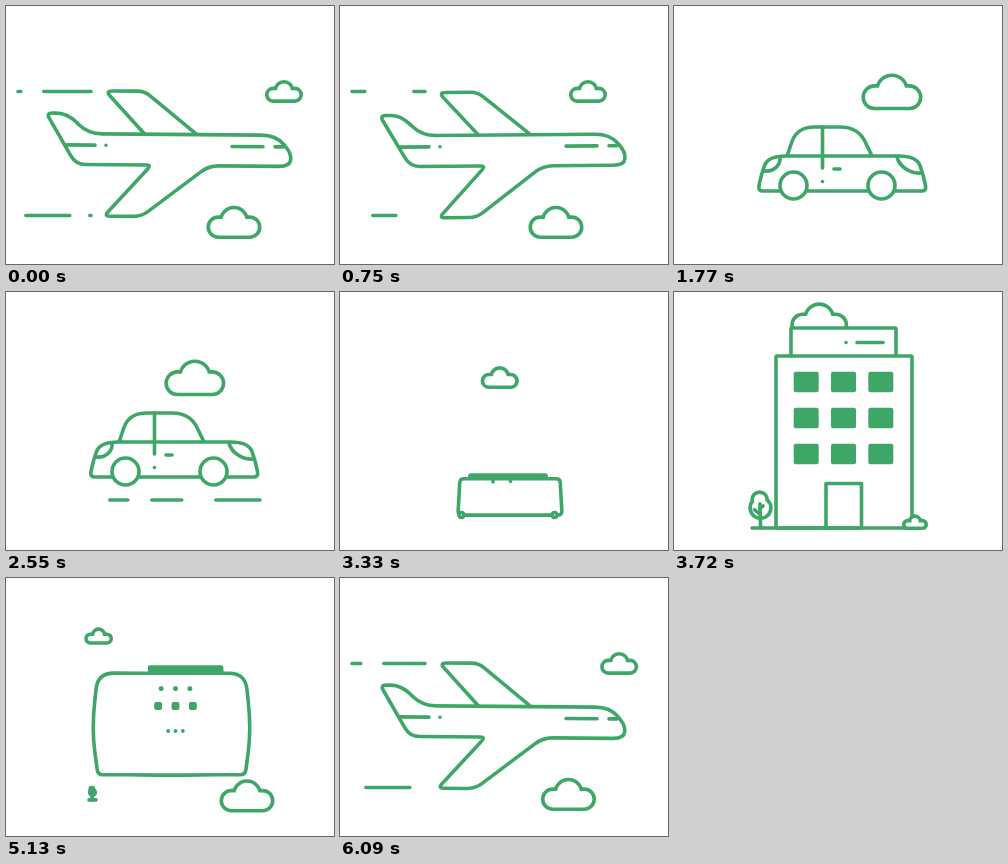
An HTML page with a canvas for the animation above (6.12 s loop, 328 by 258 pixels).

```html
<!DOCTYPE html>
<html lang="en">
<head>
<meta charset="utf-8">
<title>Plane, car, building</title>
<style>
html, body { margin: 0; width: 100%; height: 100%; overflow: hidden; background: #fff; }
canvas { display: block; }
</style>
</head>
<body>
<canvas id="stage" width="328" height="258"></canvas>
<script>
const c = document.getElementById('stage').getContext('2d');
const GREEN = '#3ea768', LOOP = 6120, LINE = 3.6, FIRST_MORPH = 1530, SCENE = 1800;

const lerp = (a, b, k) => a + (b - a) * k;
const ramp = (t, a, b) => Math.min(1, Math.max(0, (t - a) / (b - a)));
const blend = (a, b, k) => a.map((v, i) => lerp(v, b[i], k));

// 0 plane, 1 car, 2 building, 3 plane again; halves are the squashed shapes between
function phaseAt(t) {
  let p = 0;
  for (let i = 0; i < 3; i++) {
    const mid = FIRST_MORPH + i * SCENE;
    p += (ramp(t, mid - 100, mid) + ramp(t, mid, mid + 170)) / 2;
  }
  return p;
}
// Seven poses, one for each half phase
function pose(p, poses) {
  const i = Math.min(5, Math.floor(p * 2));
  return blend(poses[i], poses[i + 1], p * 2 - i);
}

// Box as a ring of [x, y, radius], with leaning and bulging sides
function box(x1, y1, x2, y2, lean, bulge, r) {
  const side = lean / 2 - bulge, y = lerp(y1, y2, .55), foot = Math.min(r, 5);
  const bottom = [.2, .4, .6, .8].map(k => [lerp(x2, x1, k), y2, 0]);
  return [[x1 + side, y, 36], [x1 + lean, y1, r], [lerp(x1, x2, .3), y1, 0], [x2 - lean, y1, r],
    [x2 - side, y, 36], [x2, y2, foot], ...bottom, [x1, y2, foot]].flat();
}
const plane = [
  [40, 108.3, 6], [61, 108.3, 13], [82, 128.7, 14], [270, 128.7, 15], [285.5, 147, 8], [284, 159.8, 11],
  [203, 159.8, 10], [136, 211, 8], [98.5, 211, 6], [145.5, 159.5, 5], [70, 159.5, 10]].flat();
const bodies = [
  plane,
  box(78, 128, 262, 168, 4, 3, 10),
  box(84, 150, 252.5, 185, 10, 2, 18),
  box(118, 187.5, 222, 223, 2, 0, 4),
  box(102, 64, 238, 236, 0, 0, 1),
  box(92, 95, 239, 197, 0, 6, 16),
  plane];

// Open trapezoid on top of the body: x1, x2, base, height, left lean, right lean, radius
const wing = [138, 190, 128, 42.3, -39, 52, 7];
const roofs = [
  wing,
  [130, 194, 130, 4, 2, 2, 2],
  [113, 198, 150, 29, 10, 14, 18],
  [130, 206, 187, 3, 0, 0, 1],
  [117, 222, 64, 28, 0, 0, 1],
  [144, 216, 95, 6, 0, 0, 0],
  wing];
const skyClouds = [[86, 0], [86, 19], [86, 61], [86, 38], [28, 58], [58, 29], [86, 0]];

function outlinePath(v, closed) {
  const p = [];
  for (let i = 0; i < v.length; i += 3) p.push(v.slice(i, i + 3));
  const n = p.length;
  const toward = (a, b) => blend(a, b, Math.min(.5, a[2] / (Math.hypot(b[0] - a[0], b[1] - a[1]) || 1)));
  c.beginPath();
  p.forEach(([x, y, r], i) => {
    const before = toward(p[i], p[(i + n - 1) % n]), after = toward(p[i], p[(i + 1) % n]);
    if (!closed && i % (n - 1) === 0) return c.lineTo(x, y);
    c.lineTo(before[0], before[1]);
    c.quadraticCurveTo(x, y, after[0], after[1]);
  });
  if (closed) c.closePath();
  c.fill();
  c.stroke();
}
function roof([x1, x2, y, h, left, right, r]) {
  c.fillStyle = h < 8 ? GREEN : '#fff';
  outlinePath([x1, y, 0, x1 + left, y - h, r, x2 - right, y - h, r, x2, y, 0], false);
}
function line(x1, y1, x2 = x1, y2 = y1) {
  c.beginPath();
  c.moveTo(x1, y1);
  c.lineTo(x2 + .01, y2);
  c.stroke();
}
// Speed lines: the pattern slides left and first enters from the right
function dashes(x1, x2, y, age, pattern, shift) {
  const left = Math.max(x1, x2 - .2 * age);
  if (left >= x2) return;
  c.setLineDash(pattern);
  c.lineDashOffset = left + shift;
  line(left, y, x2, y);
  c.setLineDash([]);
}
function disc(x, y, r) {
  c.beginPath();
  c.arc(x, y, Math.max(0, r), 0, 7);
  c.fill();
}
// A green shape with its white inset on top, so overlapping parts share one outline
function outlined(shape) {
  c.fillStyle = GREEN;
  shape(0);
  c.fillStyle = '#fff';
  shape(LINE);
}
function cloud(x, y, w) {
  if (w < 1) return;
  outlined(d => {
    const pw = w - 2 * d, ph = Math.max(0, .43 * w - 2 * d);
    c.beginPath();
    c.roundRect(x - pw / 2, y - .13 * w + d, Math.max(0, pw), ph, ph / 2);
    c.fill();
    disc(x, y - .03 * w, .275 * w - d);
  });
}

function planeDetails() {
  line(60, 140, 89, 140);
  line(100, 140);
  line(226, 140.3, 257, 140.3);
  line(269, 140.3, 277, 140.3);
}
function carDetails(p) {
  const grown = ramp(p, .5, 1), squash = ramp(p, 1, 1.5);
  if (p > .95) {
    const [x, top, end, h1, h2, hy] =
      blend([148.5, 121, 162, 160, 166, 163], [153, 188, 190, 170.5, 170.5, 189.5], squash);
    line(x, top, x, end);
    line(h1, hy, h2, hy);
  }
  if (p > .95 && p < 1.05) {
    line(148.5, 175.5);
    c.beginPath();
    c.moveTo(106, 151);
    c.bezierCurveTo(107, 159, 100, 166, 90, 165);
    c.moveTo(223, 151);
    c.bezierCurveTo(225, 160, 236, 168, 247, 167);
    c.stroke();
  }
  for (const side of [-1, 1]) {
    const x = lerp(163.5, 168, squash) + side * lerp(44, 46.5, squash);
    c.beginPath();
    c.arc(x, lerp(179.5, 223, squash), grown * lerp(13.5, 2.5, squash), 0, 7);
    c.fill();
    c.stroke();
  }
}
function houseDetails(p) {
  const k = Math.min(3 * p - 5, 5 - 2 * p);
  c.fillStyle = GREEN;
  // Squashed rows: spacing, height on the stage, dot size
  [[14.5, 110.5, 5], [17.5, 128, 8], [7.5, 153, 4]].forEach(([gap, y, size], row) => {
    const w = Math.max(0, lerp(size, 25, k)), h = Math.max(0, lerp(size, 20.5, k));
    for (let col = -1; col < 2; col++) {
      c.beginPath();
      c.roundRect(169.5 + col * lerp(gap, 37.3, k) - w / 2, lerp(y, 90 + 36 * row, k) - h / 2, w, h, 2);
      c.fill();
    }
  });
  if (k >= 0) c.strokeRect(...blend([158, 168, 36.5, 22.5], [152, 191.5, 35.5, 44.5], k));
  if (k > .9) {
    line(172, 50.5);
    line(183, 50.5, 209, 50.5);
  }
}
function garden(p, grow) {
  const leave = Math.max(0, p - 2), s = grow * (1 - 1.7 * leave), y = 236 - 28 * leave;
  if (s <= 0) return;
  const left = lerp(78, 83, ramp(leave, 0, .5));
  line(left, y, lerp(left + 7, 262, grow * (1 - ramp(leave, 0, .5))), y);
  outlined(d => {
    disc(86 - s, y - 73 * s, 24 * s - d);
    disc(86.5, y - 52 * s, 31.5 * s - d);
  });
  const twig = (a, b, e, f) => line(86 + a * s, y - b * s, 86 + e * s, y - f * s);
  twig(0, 62, 1.5, 0);
  twig(0, 50, 8, 57);
  twig(0, 35, -14, 47);
}

function draw(t) {
  const p = phaseAt(t), flight = t > LOOP / 2 ? t - LOOP : t;
  const flying = Math.max(0, 1 - 2 * Math.min(p, 3 - p));
  const grow = ramp(t, 3620, 3880);
  c.fillStyle = '#fff';
  c.fillRect(0, 0, 328, 258);
  c.strokeStyle = GREEN;
  c.lineWidth = LINE;
  c.lineCap = c.lineJoin = 'round';

  const [skyY, skyW] = pose(p, skyClouds);
  cloud(284 - .0373 * t, skyY, skyW);
  cloud(278 - .04 * flight, 85.5, 38 * ramp(flight, -700, -550) * flying);
  if (flying === 1) {
    dashes(12, 85, 85.5, flight + 760, [66, 34, 37, 49, 56, 23], .2 * flight - 38);
    dashes(12, 85, 209.5, flight + 760, [44, 20, 58, 41, 23, 39], .2 * flight - 20);
  }
  if (p === 1) dashes(81, 254, 208, t - 1800, [56, 24, 30, 34], .2 * t);

  c.save();
  c.translate(200, 140);
  c.rotate(.008 * flying * Math.cos(flight * Math.PI / 750));
  c.translate(-200, -140);
  roof(pose(p, roofs));
  c.fillStyle = '#fff';
  outlinePath(pose(p, bodies), true);
  if (flying === 1) planeDetails();
  c.restore();

  if (p > .5 && p < 1.6) carDetails(p);
  if (p > 1.5 && p < 2.8) houseDetails(p);
  garden(p, grow);
  const lowW = Math.max(55 * (1 - 2 * p), grow * lerp(67, 55, ramp(p, 2, 2.5)));
  cloud(Math.min(241, 228 - .016 * flight), lerp(238, 218, flight > 0 ? 1 : grow) - 1.5 * flying, lowW);
}

const start = performance.now();
(function frame() {
  draw((performance.now() - start) % LOOP);
  requestAnimationFrame(frame);
})();
</script>
</body>
</html>
```
